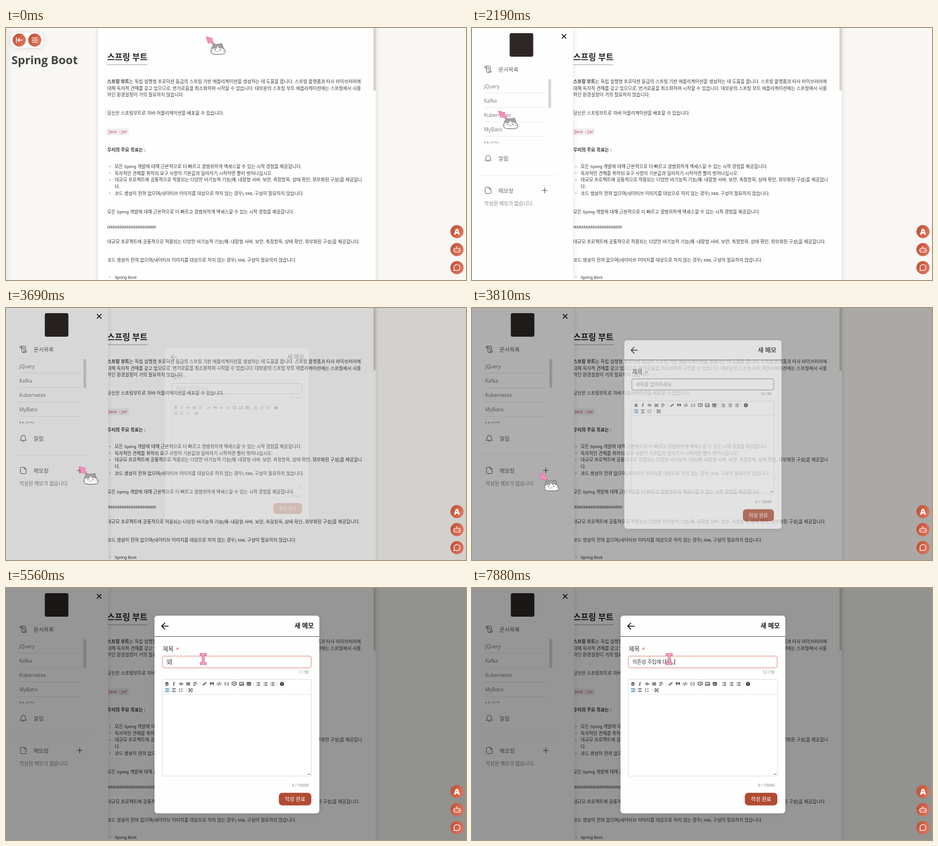
Recreate the animation shown at these times as an HTML page. Size 800x439 px, loop 8000 ms.

```html
<!DOCTYPE html>
<html lang="ko">
<head>
<meta charset="utf-8">
<title>Memo</title>
<style>
html, body { margin: 0; width: 100%; height: 100%; overflow: hidden; background: #f8f7f3; }
svg { display: block; width: 100%; height: 100%; }
text { white-space: pre; }
.doc { font: 7.27px "Liberation Sans", "Noto Sans CJK KR", "Noto Sans CJK", sans-serif; fill: #383838; }
.doc .k { font-size: 1.087em; }
.ui { font-family: "Noto Sans CJK KR", "Noto Sans CJK", sans-serif; }
.lat { font-family: "Open Sans", "Noto Sans", sans-serif; }
.b { font-weight: 700; }
.line { fill: none; stroke-linecap: round; stroke-linejoin: round; }
</style>
</head>
<body>
<svg id="stage" viewBox="0 0 800 439" xmlns="http://www.w3.org/2000/svg"></svg>
<script>
const LOOP = 8000;
const clamp = v => Math.max(0, Math.min(1, v));
const ramp = (t, start, dur) => clamp((t - start) / dur);
const easeOut = p => 1 - (1 - p) ** 3;

const ko = s => s.replace(/[가-힣]+/g, m => `<tspan class="k">${m}</tspan>`);
const doc = (x, y, s, extra = '') => `<text class="doc" x="${x}" y="${y}" ${extra}>${s.includes('<') ? s : ko(s)}</text>`;
const label = (x, y, size, s, fill, extra = '', cls = 'ui') =>
  `<text class="${cls}" x="${x}" y="${y}" font-size="${size}" fill="${fill}" ${extra}>${s}</text>`;
const rect = (x, y, w, h, fill, r = 0, extra = '') =>
  `<rect x="${x}" y="${y}" width="${w}" height="${h}" rx="${r}" fill="${fill}" ${extra}/>`;
const path = (d, color, w = 1, extra = '') =>
  `<path class="line" d="${d}" stroke="${color}" stroke-width="${w}" ${extra}/>`;
const at = (x, y, body, extra = '') => `<g transform="translate(${x} ${y})" ${extra}>${body}</g>`;
const disc = (x, y, icon, id = '') =>
  at(x, y, `<g ${id}><circle r="11.4" fill="url(#clay)"/>${icon}</g>`);

function page() {
  const body = [
    [96.2, '<tspan class="b">' + ko('스프링 부트') + '</tspan>' + ko('는 독립 실행형 프로덕션 등급의 스프링 기반 애플리케이션을 생성하는 데 도움을 줍니다. 스프링 플랫폼과 타사 라이브러리에')],
    [107.8, '대해 독자적 견해를 갖고 있으므로, 번거로움을 최소화하여 시작할 수 있습니다. 대부분의 스프링 부트 애플리케이션에는 스프링에서 사용'],
    [119.4, '하던 환경설정이 거의 필요하지 않습니다.'],
    [151.2, '당신은 스프링부트로 자바 어플리케이션을 배포할 수 있습니다.'],
    [322.9, '모든 Spring 개발에 대해 근본적으로 더 빠르고 광범위하게 액세스할 수 있는 시작 경험을 제공합니다.'],
    [349.2, 'd'.repeat(21)],
    [375, '대규모 프로젝트에 공통적으로 적용되는 다양한 비기능적 기능(예: 내장형 서버, 보안, 측정항목, 상태 확인, 외부화된 구성)을 제공합니다.'],
    [406.8, '코드 생성이 전혀 없으며(네이티브 이미지를 대상으로 하지 않는 경우) XML 구성이 필요하지 않습니다.']
  ];
  const bullets = [
    [244.2, '모든 Spring 개발에 대해 근본적으로 더 빠르고 광범위하게 액세스할 수 있는 시작 경험을 제공합니다.'],
    [255.8, '독자적인 견해를 취하되 요구 사항이 기본값과 달라지기 시작하면 빨리 벗어나십시오.'],
    [267.4, '대규모 프로젝트에 공통적으로 적용되는 다양한 비기능적 기능(예: 내장형 서버, 보안, 측정항목, 상태 확인, 외부화된 구성)을 제공합니'],
    [290.8, '코드 생성이 전혀 없으며(네이티브 이미지를 대상으로 하지 않는 경우) XML 구성이 필요하지 않습니다.'],
    [436.6, 'Spring Boot']
  ];
  return rect(0, 0, 800, 439, '#f8f7f3') +
    rect(0, 0, 12, 439, 'url(#edge)') +
    rect(160, -20, 483, 480, '#fefefe', 0, 'filter="url(#soft)"') +
    rect(639, 0, 4.5, 109, '#dcd3cd', 1) +
    doc(176, 56, '스프링 부트', 'style="font-size:13.3px;font-weight:700;fill:#222"') +
    rect(175.5, 63, 70.5, 2, '#cfcfcf') +
    body.map(([y, s]) => doc(176, y, s)).join('') +
    rect(175, 175, 38.5, 11.5, '#eeeeee', 1.5) +
    `<text x="177" y="183" font-size="6.35" fill="#cf3b63" font-family="'Liberation Mono', monospace">java -jar</text>` +
    doc(176, 214.8, '우리의 주요 목표는 :', 'style="font-weight:700"') +
    bullets.map(([y, s]) => `<circle cx="180.8" cy="${y - 3}" r="1.2" fill="#b5b5b5"/>` + doc(189, y, s)).join('') +
    doc(189, 279.1, '다.') +
    rect(8, 8, 58, 26.5, '#fff', 12, 'filter="url(#soft)"') +
    disc(23, 21, path('M-5 -4.5V4.5M5 0H-2.5M.5 -3L-2.5 0L.5 3', '#fff', 1.3)) +
    disc(50, 21, path('M-4.7 -3.7H4.7M-4.7 0H4.7M-4.7 3.7H4.7', '#fff', 1.3), 'id="menu"') +
    label(9.5, 63.3, 20, 'Spring Boot', '#444', 'font-weight="700"', 'lat');
}

function drawer() {
  const items = ['jQuery', 'Kafka', 'Kubernetes', 'MyBatis', 'MySQL'];
  const list = items.map((s, i) =>
    label(23, 105.2 + 25 * i, 8.65, s, '#777', '', 'lat') +
    rect(23, 113.2 + 25.1 * i, 108, .8, '#e4e4e4')).join('');
  return rect(-20, -20, 197.6, 480, '#fefefe', 0, 'filter="url(#soft)"') +
    rect(67.5, 9, 41, 41, '#2d2725', 3) +
    path('M158.5 11L165.5 18M165.5 11L158.5 18', '#111', 1.5) +
    at(30, 72, path('M-5.5 -2.5V-4Q-5.5 -5.5 -4 -5.5Q-2.5 -5.5 -2.5 -4V3.5Q-2.5 5.5 -.5 5.5H4Q5.7 5.5 5.7 3H1.3Q1.3 5.5 -.5 5.5M-4 -5.5H2.5Q4 -5.5 4 -4V3M-5.5 -2.5H-2.5M-.5 -2.5H2M-.5 0H2', '#666')) +
    label(48, 75.6, 9.5, '문서목록', '#666') +
    `<g clip-path="url(#list)">${list}</g>` +
    rect(134.7, 89, 4.8, 50.5, '#dcd3cd', 2.2) +
    at(30, 227, path('M-5 3.2Q-3.6 1.5 -3.6 -1.5Q-3.6 -5.3 0 -5.3Q3.6 -5.3 3.6 -1.5Q3.6 1.5 5 3.2ZM-1.2 5.5H1.2', '#666')) +
    label(48, 230.6, 9.5, '알림', '#666') +
    rect(8, 257.3, 143, .8, '#ececec') +
    rect(8, 266.5, 143, 49.5, '#efefef', 5, 'id="hover"') +
    at(30, 283, path('M-5 -4Q-5 -5.5 -3.5 -5.5H2L5 -2.5V4Q5 5.5 3.5 5.5H-3.5Q-5 5.5 -5 4ZM2 -5.5V-2.5H5', '#666')) +
    label(48, 286.6, 9.5, '메모장', '#666') +
    path('M123.8 283H132.8M128.3 278.5V287.5', '#555', 1.1) +
    label(23.5, 309.3, 8.56, '작성된 메모가 없습니다.', '#888');
}

function tools() {
  const ink = '#333';
  const p = (x, d, y = 167, c = ink) => at(x, y, path(d, c, 1));
  const word = (x, s, style) => `<text x="${x}" y="170" font-size="8.4" text-anchor="middle" fill="#222" font-family="'Liberation Serif', serif" style="${style}">${s}</text>`;
  const rows = 'M-3 -2.5H3M-1 0H3M-3 2.5H3';
  const bars = [[337, 167], [430, 167], [471, 167], [313, 178]];
  const list = x => p(x, 'M-1 -2.5H3M-1 0H3M-1 2.5H3M-3 -2.5H-2.9M-3 0H-2.9M-3 2.5H-2.9');
  return word(280, 'B', 'font:700 8.2px Liberation Sans,sans-serif') + word(292, 'I', 'font-style:italic;font-weight:700') +
    word(304.5, 'S', 'font-weight:400') + p(304.5, 'M-3.5 0H3.5') +
    p(316.8, 'M-3.2 0H3.2M-2.7 -2.7V-1.7H2.7V-2.7M-2.7 2.7V1.7H2.7V2.7') +
    p(329, 'M-3 -2.5H2M-3 0H3M-3 2.5H0') +
    p(345.3, 'M-.5 1.4L-1.5 2.4Q-3 3 -3 1.5L-.9 -.8M.5 -1.4L1.5 -2.4Q3 -3 3 -1.5L.9 .8M-1 1L1 -1') +
    at(358, 167, `<path d="M-3.5 -2.5H-.5V0L-2 2.5H-3L-2 0H-3.5ZM.5 -2.5H3.5V0L2 2.5H1L2 0H.5Z" fill="${ink}"/>`) +
    p(370.5, 'M-1.8 -2L-3.8 0L-1.8 2M1.8 -2L3.8 0L1.8 2M.7 -2.7L-.7 2.7') +
    p(383.7, 'M-2 -2.5H-2.6V-.6L-3.3 0L-2.6 .6V2.5H-2M2 -2.5H2.6V-.6L3.3 0L2.6 .6V2.5H2M0 -1V-.9M0 1V1.1') +
    p(397, 'M-3.5 -3H3.5V1.8H1L0 3.4L-1 1.8H-3.5ZM-1.5 -.6H1.5') +
    p(409.8, 'M-3.3 -2.7H3.3V2.7H-3.3ZM-2.5 2L-1 0L.3 1L1.4 -.4L3 2') +
    p(422.6, 'M-3 -2.7H3V2.7H-3ZM-3 -1.8H3M-3 .3H3M0 -2V2.7') +
    list(438.5) + list(451) + list(463.5) +
    `<circle cx="480" cy="167" r="3.5" fill="${ink}"/>` +
    label(480, 169.3, 6, '?', '#fff', 'text-anchor="middle" font-weight="700"', 'lat') +
    rect(275.5, 173.5, 9, 9, '#dbe9f8') + p(280, rows, 178, '#4a7fc0') +
    p(292, 'M-3 -2.5H3M-1.3 0H1.3M-3 2.5H3', 178) + p(304.5, 'M-3 -2.7V2.7M-1 -2H3M-1 2H3', 178, '#666') +
    p(321, 'M-3 -1V-2.7H-1M1 -2.7H3V-1M3 1V2.7H1M-1 2.7H-3V1M-1 -.6H1V.6H-1Z', 178) +
    bars.map(([x, y]) => rect(x, y - 4, .6, 8, '#ccc')).join('');
}

function dialog() {
  return rect(258.3, 48.3, 286.6, 344.2, '#fefefe', 5, 'filter="url(#soft)"') +
    path('M282 66.5H271M276 61.2L270.7 66.5L276 71.8', '#111', 1.6) +
    label(535.5, 69.9, 11.1, '새 메모', '#222', 'text-anchor="end" font-weight="700"') +
    rect(258.3, 84, 286.6, .9, '#555') +
    label(272.5, 109.8, 10.4, '제목', '#333', 'font-weight="500"') +
    label(295.5, 110.5, 10, '*', '#e0506a', '', 'lat') +
    rect(272, 118.7, 258.8, 20.3, '#fff', 3, 'id="field" stroke-width=".9"') +
    label(279, 132.1, 8.6, '제목을 입력하세요', '#999', 'id="hint"') +
    label(279, 132.1, 8.6, '', '#333', 'id="typed"') +
    rect(0, 123.5, .9, 10.5, '#222', 0, 'id="caret"') +
    label(526.3, 148.9, 6.7, '', '#777', 'id="count" text-anchor="end"', 'lat') +
    rect(271.8, 159.3, 259.3, 168.3, '#fff', 1, 'stroke="#d6d6d6" stroke-width=".8"') +
    tools() +
    rect(272, 185, 259, .7, '#dcdcdc') +
    path('M525 324.5H529', '#555', .9) +
    label(526.3, 346.2, 6.7, '0 / 15000', '#777', 'text-anchor="end"', 'lat') +
    rect(474.5, 356.8, 56.5, 22, '#b14b33', 6) +
    label(502.7, 371.1, 8.95, '작성 완료', '#fff', 'text-anchor="middle" font-weight="500"');
}

function floats() {
  return disc(784.3, 354.7, label(0, 5.2, 14.5, 'A', '#fff', 'text-anchor="middle" font-weight="900"', 'lat')) +
    disc(784.3, 386, path('M-5 -2H5V4.5H-5ZM0 -2V-5H-1.6M-2 .5V2M2 .5V2M-6.6 1.3H-5M5 1.3H6.6', '#fff', 1.1)) +
    disc(784.3, 417.4, path('M-5.4 5.4L-4.5 2.6A5.3 5.3 0 1 1 -2.4 4.6Z', '#fff', 1.2));
}

function pointers() {
  const arrow = '<path d="M0 0L11.5 3.2L9.5 6L13 9.5L10 13L6.5 9.8L3.8 12Z" fill="#f490bd" stroke="#e0689f" stroke-width=".9"/>';
  const paw = '<g fill="#f7b3cc" stroke="#d07a9b" stroke-width=".7"><circle cx="7.5" cy="11" r="5"/>' +
    [[1.8, 6], [5.2, 3], [9.6, 3], [13, 6]].map(([x, y]) => `<circle cx="${x}" cy="${y}" r="2.1"/>`).join('') + '</g>';
  const pet = '<path d="M9.5 21L13 11.5L17 14Q20 12.5 23 13.5L27.5 12L29.5 19Q34 24 33.5 28Q32 31 21 31Q10 31 8.5 27.5Q8 24 9.5 21Z" fill="#fff" stroke="#4c4848" stroke-width=".9"/>' +
    '<path d="M13.2 12.3L17 14.5Q20 13 23 14L27.1 12.6L29.2 19.5L31.8 23.5Q27 18.5 23 21L20.3 17L17.6 21.5Q14 19.5 10 22.5Z" fill="#a29fa1"/>' +
    '<path d="M15.6 22.3v1.6M24.6 22.3v1.6" stroke="#222" stroke-width="1.5"/><path d="M19 23.8h2l-1 1.2z" fill="#e58ba5"/>' +
    path('M17.5 26Q19 27 20 25.4Q21 27 22.5 26M11 25.5L8.8 25M29 25.5L32 25', '#777', .7);
  return `<g id="cursor"><g id="pet">${pet}</g><g id="arrow">${arrow}</g><g id="paw">${paw}</g></g>` +
    at(343, 123.7, '<path d="M-5.5 -10H-1.5L0 -9L1.5 -10H5.5V-6H2V6H5.5V10H1.5L0 9L-1.5 10H-5.5V6H-2V-6H-5.5Z" fill="#f4a0c0" stroke="#cf7096" stroke-width=".9"/>', 'id="beam"');
}

document.getElementById('stage').innerHTML = `<defs>
  <linearGradient id="clay" x2="1" y2=".4"><stop stop-color="#b94e36"/><stop offset="1" stop-color="#e07154"/></linearGradient>
  <linearGradient id="edge"><stop stop-color="#ecebe7"/><stop offset="1" stop-color="#f8f7f3"/></linearGradient>
  <filter id="soft" x="-20%" y="-40%" width="140%" height="180%"><feDropShadow dx="0" dy="1" stdDeviation="4" flood-opacity=".12"/></filter>
  <clipPath id="list"><rect x="8" y="89" width="140" height="112"/></clipPath>
</defs>` + page() + `<g id="drawer">${drawer()}</g>` +
  rect(0, 0, 800, 439, '#000', 0, 'id="shade"') + `<g id="dialog">${dialog()}</g>` + floats() + pointers();

const $ = {};
document.querySelectorAll('[id]').forEach(e => { $[e.id] = e; });
const show = (el, on) => el.setAttribute('visibility', on ? 'visible' : 'hidden');

// time, x, y of the pointer tip
const route = [
  [690, 181, 27], [1130, 60, 14], [1290, 30, 14], [1440, 42, 18], [1940, 42, 18],
  [2400, 50, 250], [2690, 28, 405], [2750, 28, 400], [2940, 122, 279], [3190, 124, 274],
  [3500, 124, 274], [3690, 127, 276], [3810, 117, 288], [4250, 300, 143], [4480, 341, 122]
];
function tip(t) {
  if (t < 60) return [348, 15];
  if (t < 130) return [352, 58];
  const i = route.findIndex(k => k[0] > t);
  if (i < 1) return null;
  const [a, b] = [route[i - 1], route[i]];
  const p = (t - a[0]) / (b[0] - a[0]);
  return [a[1] + (b[1] - a[1]) * p, a[2] + (b[2] - a[2]) * p];
}

const word1 = '의존성 ', word2 = word1 + '주입', word3 = word2 + '에 ';
const keys = [
  [4630, 'ㅇ'], [5250, '으'], [5440, '의'], [5530, '읮'], [5650, '의조'], [5760, '의존'],
  [5870, '의존ㅅ'], [5970, '의존서'], [6080, '의존성'], [6190, word1],
  [6310, word1 + 'ㅈ'], [6430, word1 + '주'], [6540, word1 + '중'], [6650, word1 + '주이'],
  [6770, word2], [6880, word2 + 'ㅇ'], [7000, word2 + '어'], [7130, word2 + '에'],
  [7210, word3], [7300, word3 + 'ㄷ'], [7380, word3 + '대'], [7460, word3 + '댛'],
  [7550, word3 + '대해'], [7630, word3 + '대해.'], [7880, word3 + '대해..']
];

function draw(t) {
  const press = Math.sin(Math.PI * ramp(t, 1500, 190));
  $.menu.setAttribute('transform', `scale(${1 - .08 * press})`);

  const slide = easeOut(ramp(t, 1940, 320));
  $.drawer.setAttribute('transform', `translate(${-200 * (1 - slide)} 0)`);
  show($.drawer, t >= 1940);
  $.hover.setAttribute('opacity', ramp(t, 2500, 100) * (1 - ramp(t, 3520, 120)));

  const open = ramp(t, 3580, 300), size = .8 + .2 * open;
  $.shade.setAttribute('opacity', .41 * open);
  $.dialog.setAttribute('opacity', open ** 1.6);
  $.dialog.setAttribute('transform', `translate(401.5 220.5) scale(${size}) translate(-401.5 -220.5)`);
  show($.dialog, open > 0);

  const focus = t >= 4560;
  $.field.setAttribute('stroke', focus ? '#dc7b69' : '#777');
  const last = keys.filter(k => k[0] <= t).pop();
  const text = last ? last[1] : '';
  $.typed.textContent = text;
  $.count.textContent = `${text.length} / 50`;
  $.hint.setAttribute('opacity', text ? 0 : 1);
  const end = text ? $.typed.getComputedTextLength() : 0;
  $.caret.setAttribute('x', 279.3 + end);
  $.caret.setAttribute('opacity', focus && !(t >= 4880 && t < 5250) ? 1 : 0);

  const pos = tip(t);
  const hand = t >= 1290 && t < 2000;
  if (pos) $.cursor.setAttribute('transform', `translate(${pos[0]} ${pos[1]})`);
  $.cursor.setAttribute('opacity', pos && !(t >= 130 && t < 690) ? 1 : 0);
  $.arrow.setAttribute('opacity', hand ? 0 : 1);
  $.paw.setAttribute('opacity', hand ? 1 : 0);
  show($.beam, t >= 4480);
}

function tick() {
  draw(performance.now() % LOOP);
  requestAnimationFrame(tick);
}
tick();
</script>
</body>
</html>
```
